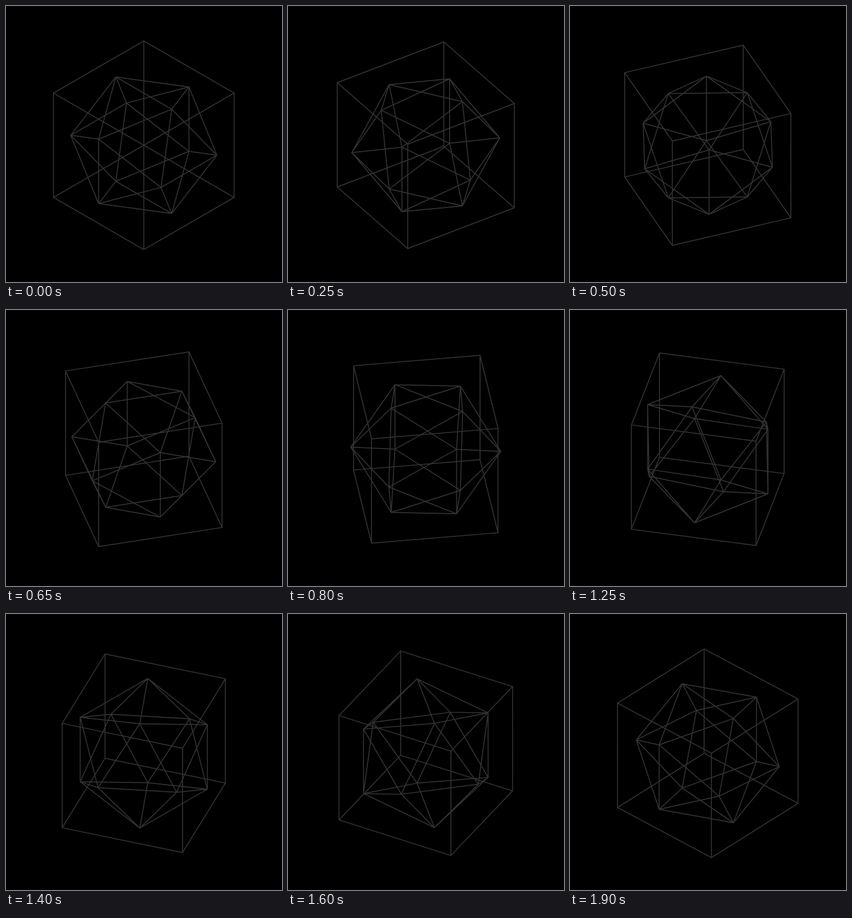
Recreate the animation shown at these times as an HTML page with a canvas. Size 500 by 500 pixels, loop 1950 ms.

```html
<!DOCTYPE html>
<html lang="en">
<head>
<meta charset="utf-8">
<title>Icosahedron in a cube</title>
<style>
html, body { margin: 0; width: 100%; height: 100%; overflow: hidden; background: #000; }
canvas { display: block; width: 500px; height: 500px; }
</style>
</head>
<body>
<canvas id="stage" width="500" height="500"></canvas>
<script>
const ctx = document.getElementById('stage').getContext('2d');
const STEP = 50, STEPS = 39;
const CX = 249.6, CY = 252.25;
const HALF = 115.74;                 // half of the cube's side
const PHI = (1 + Math.sqrt(5)) / 2;
const RISE = Math.sqrt(2 / 3);       // isometric view: height scale
const DEPTH = Math.sqrt(1 / 3);      // isometric view: depth scale
const SIGNS = [-1, 1];

// Both solids are defined so that every edge has length 2.
function solid(points, scale, turn) {
  const edges = [];
  points.forEach((p, i) => points.slice(i + 1).forEach(q => {
    const d = Math.hypot(p[0] - q[0], p[1] - q[1], p[2] - q[2]);
    if (Math.abs(d - 2) < 0.01) edges.push([p, q]);
  }));
  return { edges, scale, turn };
}

const cubePoints = [], icoPoints = [];
for (const a of SIGNS) for (const b of SIGNS) {
  for (const c of SIGNS) cubePoints.push([a, b, c]);
  icoPoints.push([0, a, b * PHI], [a, b * PHI, 0], [b * PHI, 0, a]);
}

const solids = [
  solid(cubePoints, HALF, Math.PI / 2),
  solid(icoPoints, HALF / PHI, -Math.PI)
];

function project([x, y, z], scale, angle) {
  const c = Math.cos(angle), s = Math.sin(angle);
  return [
    CX + scale * (x * c - z * s),
    CY + scale * ((x * s + z * c) * DEPTH - y * RISE)
  ];
}

function draw(progress) {
  ctx.fillStyle = '#000';
  ctx.fillRect(0, 0, 500, 500);
  ctx.strokeStyle = '#333';
  ctx.lineWidth = 1.7;
  ctx.lineCap = 'round';
  ctx.beginPath();
  for (const { edges, scale, turn } of solids) {
    const angle = Math.PI / 4 + turn * progress;
    for (const [p, q] of edges) {
      ctx.moveTo(...project(p, scale, angle));
      ctx.lineTo(...project(q, scale, angle));
    }
  }
  ctx.stroke();
}

const start = performance.now();
function tick() {
  const step = Math.floor((performance.now() - start) / STEP) % STEPS;
  draw(step / STEPS);
  requestAnimationFrame(tick);
}
tick();
</script>
</body>
</html>
```
